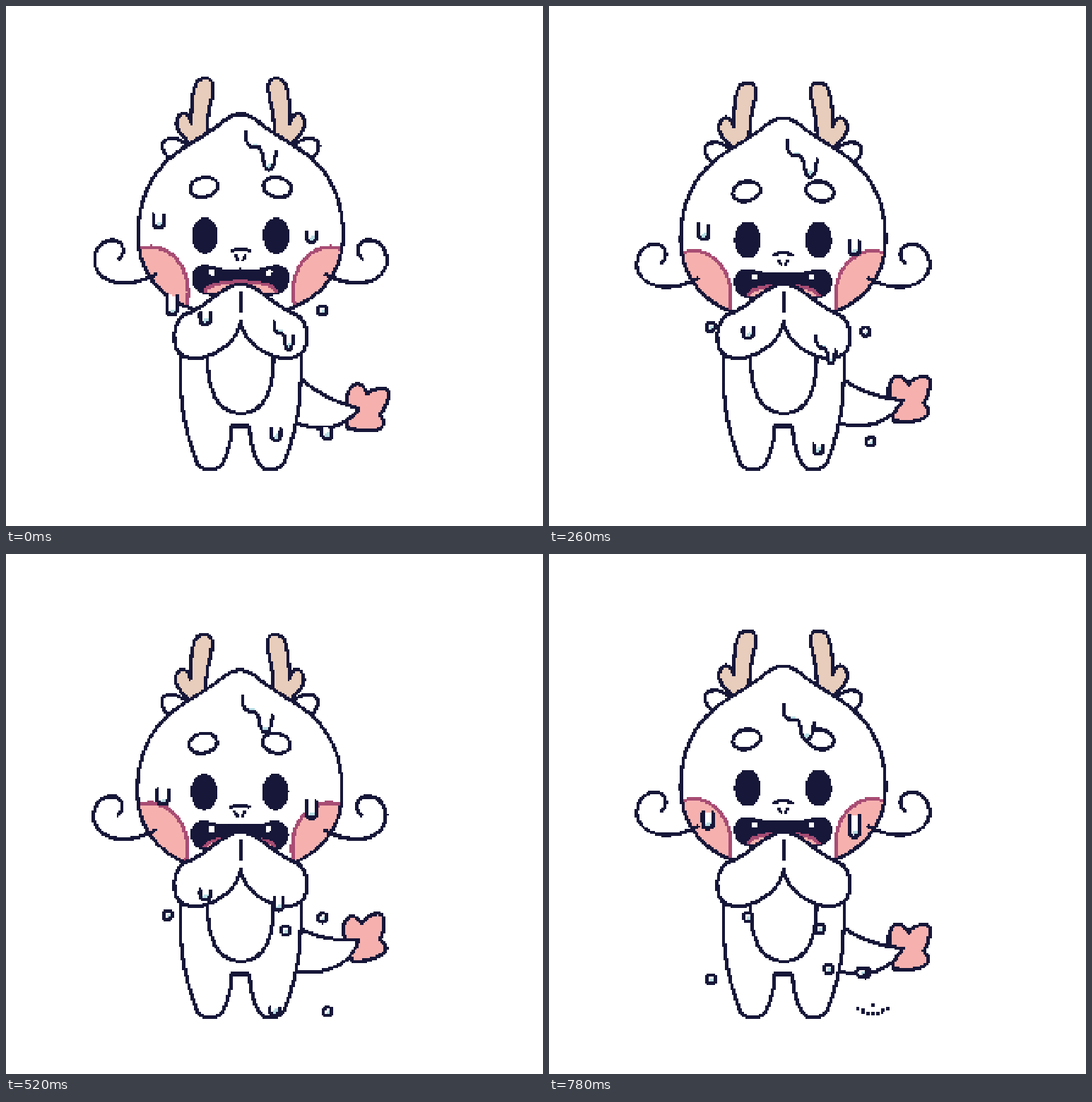
An HTML page with a canvas for the animation above (1.04 s loop, 760 by 736 pixels).

```html
<!DOCTYPE html>
<html lang="en">
<head>
<meta charset="utf-8">
<title>Sweating little dragon</title>
<style>
  html, body { margin: 0; width: 100%; height: 100%; overflow: hidden; background: #fff; }
  canvas { display: block; width: 760px; height: 736.25px; image-rendering: pixelated; }
</style>
</head>
<body>
<canvas id="stage" width="320" height="310"></canvas>
<script>
const W = 320, H = 310, PIXEL = 2.375, STEP = 260, STEPS = 4, AXIS = 332;
const INK = '#171739', WHITE = '#ffffff', PINK = '#f6b1af', ROSE = '#a84d74',
      HORN = '#e8cdbc', WATER = '#b9dde3';

const stage = document.getElementById('stage').getContext('2d');
const layer = newContext();

function newContext() {
  const c = document.createElement('canvas');
  c.width = W;
  c.height = H;
  return c.getContext('2d', { willReadFrequently: true });
}

// Adds the mirror image across the body axis.
function both(left) {
  const path = new Path2D(left);
  path.addPath(new Path2D(left), new DOMMatrix([-1, 0, 0, 1, 2 * AXIS, 0]));
  return path;
}

function oval(x, y, rx, ry = rx, turn = 0) {
  const path = new Path2D();
  path.ellipse(x, y, rx, ry, turn, 0, 7);
  return path;
}

const HEAD = both('M332,153 C322,152 318,156 308,163 C285,183 258,194 235,213 ' +
  'C205,238 187,276 187,325 C187,365 206,410 268,431 L332,440');
const HORNS = both('M285,184 C281,155 293,135 293,115 C293,98 272,98 267,115 ' +
  'C262,132 262,150 262,166 C258,146 243,150 241,165 C240,180 252,184 260,196 L275,198');
const EARS = both('M258,198 C240,182 222,186 221,198 C221,208 228,214 234,219');
const WHISKERS = both('M212,380 C180,397 148,396 133,380 C117,362 126,333 151,331 C167,333 170,349 160,358');
const CHEEKS = both(oval(205, 405, 53, 64));
const BROWS = both(oval(280, 256.5, 20, 14, -.2));
const EYES = both(oval(281.5, 325.5, 19, 26));
const NOSE = both('M332,344 Q324,344 319,347 M325,354 L329,360');
const MOUTH = both('M332,373 C315,375 303,374 293,370 C275,364 264,372 264,386 C265,400 276,409 290,408 L332,410');
const TONGUE = oval(AXIS, 405, 50, 15);
const TEETH = both('M287,374 h8 v8 h-6 z');
const ARMS = both('M332,394 C318,394 308,402 297,410 Q275,428 256,436 C238,443 237,465 239,478 ' +
  'C243,503 274,501 290,494 C312,484 329,468 332,446');
const PALMS = new Path2D('M332,406 V433');
const BODY = both('M332,450 L247,480 C245,545 248,590 270,645 C274,659 302,660 308,645 C316,628 319,612 319,595 H332');
const BELLY = both('M285,480 C283,540 296,577 332,577');
const TUFT = new Path2D('M482,572 C478,540 500,520 511,549 C524,538 549,538 541,556 ' +
  'C538,568 534,574 529,579 C540,592 531,598 525,600 Q505,604 482,597 Z');

// Clinging drips slide down: speed and gain per step; grow lengthens, drift moves sideways.
const DRIPS = [
  { x: 216, y: 295, w: 15, h: 19, speed: 10, gain: 4.5, grow: 1.3, drift: 3 },
  { x: 432, y: 320, w: 14, h: 15, speed: 10, gain: 2.2, grow: 5.3 },
  { x: 282, y: 434, w: 15, h: 17, speed: 21, grow: -1.5, last: 2 },
  { x: 382, y: 598, w: 13, h: 17, speed: 22, grow: -3, drift: -1, last: 2 },
  { x: 235, y: 409, w: 13, h: 29, last: 0 },
  { x: 454, y: 597, w: 14, h: 16, last: 0 },
  { x: 361, y: 177, w: 42, h: 55, speed: 12.5, grow: -2, drift: -2.5, forked: true },
  { x: 393, y: 447, w: 27, h: 40, speed: 20, drift: -1, forked: true, last: 1 },
  { x: 386, y: 486, w: 12, h: 19, first: 2, last: 2 }
];

// Loose drops fall with their own speed and gravity.
const DROPS = [
  { x: 448, y: 431, speed: 18, gain: 12 },
  { x: 229, y: 454, speed: 40, gain: 17, first: 1 },
  { x: 455, y: 617, speed: 31, first: 1, last: 2 },
  { x: 396, y: 533, speed: 55, first: 2 },
  { x: 282, y: 514, first: 3 },
  { x: 383, y: 531, first: 3 },
  { x: 442, y: 592, first: 3 }
];

// Where a piece of sweat is at a step, or nothing when it is not there.
function sweatAt(list, step) {
  return list.flatMap(({ x, y, w, h, forked, speed = 0, gain = 0, grow = 0, drift = 0, first = 0, last = STEPS }) => {
    const k = step - first;
    if (k < 0 || step > last) return [];
    return { x: x + drift * k, y: y + speed * k + gain * k * k, w, h: h + grow * k, forked };
  });
}

function dripPath({ x, y, w, h, forked }) {
  const l = x - w / 2, r = x + w / 2, low = y + h, turn = low - w / 2;
  if (!forked) return new Path2D(`M${l},${y} V${turn} C${l},${low + w / 6} ${r},${low + w / 6} ${r},${turn} V${y + 1}`);
  const X = f => l + f * w, Y = f => y + f * h;
  return new Path2D(`M${l},${y} V${Y(.24)} Q${X(.08)},${Y(.42)} ${X(.28)},${Y(.41)} ` +
    `C${X(.7)},${Y(.34)} ${X(.45)},${low} ${X(.76)},${low} Q${X(.96)},${low} ${r},${Y(.52)}`);
}

// Paints one colour with hard pixel edges.
function stamp(out, color, paint, shift, clip) {
  layer.clearRect(0, 0, W, H);
  layer.save();
  layer.scale(1 / PIXEL, 1 / PIXEL);
  layer.translate(...shift);
  if (clip) layer.clip(clip);
  layer.fillStyle = layer.strokeStyle = color;
  layer.lineCap = layer.lineJoin = 'round';
  paint(layer);
  layer.restore();
  const img = layer.getImageData(0, 0, W, H), d = img.data;
  for (let i = 3; i < d.length; i += 4) d[i] = d[i] > 120 ? 255 : 0;
  layer.putImageData(img, 0, 0);
  out.drawImage(layer.canvas, 0, 0);
}

function drawStep(step) {
  const out = newContext();
  const sway = (1 - Math.cos(step / STEPS * 2 * Math.PI)) / 2;
  const bob = [-1.2 * sway, 11.4 * sway];
  let shift = [0, 0];
  const fill = (path, color, clip) => stamp(out, color, c => c.fill(path), shift, clip);
  const line = (path, color = INK, width = 5, clip) =>
    stamp(out, color, c => { c.lineWidth = width; c.stroke(path); }, shift, clip);
  const shape = (path, color) => { fill(path, color); line(path); };

  function drawTail() {
    const swing = new DOMMatrix().translate(420, 560).rotate(-17 * sway).translate(-420, -560);
    const tip = swing.transformPoint({ x: 500, y: 570 });
    const tuft = new Path2D();
    tuft.addPath(TUFT, swing);
    shape(tuft, PINK);
    shape(new Path2D(`M415,${526 + 4 * sway} Q452,${559 - 9 * sway} ${tip.x},${tip.y} ` +
      `Q${469 + 14 * sway},${611 - 13 * sway} 410,591`), WHITE);
  }

  function drawHead() {
    shift = bob;
    shape(EARS, WHITE);
    shape(HORNS, HORN);
    fill(HEAD, WHITE);
    fill(CHEEKS, PINK, HEAD);
    line(CHEEKS, ROSE, 5, HEAD);
    line(HEAD);
    line(WHISKERS);
    line(BROWS);
    fill(EYES, INK);
    line(NOSE, INK, 4.4);
    fill(MOUTH, INK);
    fill(TONGUE, PINK, MOUTH);
    line(TONGUE, ROSE, 5, MOUTH);
    line(MOUTH, INK, 3);
    fill(TEETH, WHITE);
    shift = [0, 0];
  }

  function drawSweat() {
    for (const drip of sweatAt(DRIPS, step)) {
      const { x, y, w, h, forked } = drip, path = dripPath(drip);
      fill(path, WHITE);
      fill(oval(x + (forked ? w * .28 : 2), y + h - 5, 5, 4), WATER, path);
      if (forked) fill(oval(x - w * .2, y + h * .37, 5, 3), WATER);
      line(path);
    }
    for (const { x, y } of sweatAt(DROPS, step)) {
      const ring = oval(x, y, 6.5);
      fill(ring, WHITE);
      fill(oval(x + 2, y + 2, 3.5), WATER);
      line(ring, INK, 4.6);
    }
  }

  function drawSplash() {
    const dot = (x, y) => stamp(out, INK, c => c.fillRect(x - 2.5, y - 2.5, 5, 5), shift);
    for (let i = 0; i < 7; i++) dot(437 + 7 * i, 643 + 8 * Math.sin(i / 6 * Math.PI));
    dot(458, 639);
  }

  out.fillStyle = WHITE;
  out.fillRect(0, 0, W, H);
  drawTail();
  shape(BODY, WHITE);
  line(BELLY);
  drawHead();
  shape(ARMS, WHITE);
  stamp(out, WHITE, c => c.fillRect(329, 398, 6, 43), shift);
  line(PALMS);
  drawSweat();
  if (step === STEPS - 1) drawSplash();
  return out.canvas;
}

const pictures = Array.from({ length: STEPS }, (_, step) => drawStep(step));
const start = performance.now();

function show() {
  const time = Math.max(0, performance.now() - start);
  stage.drawImage(pictures[Math.floor(time / STEP) % STEPS], 0, 0);
  requestAnimationFrame(show);
}
show();
</script>
</body>
</html>
```
